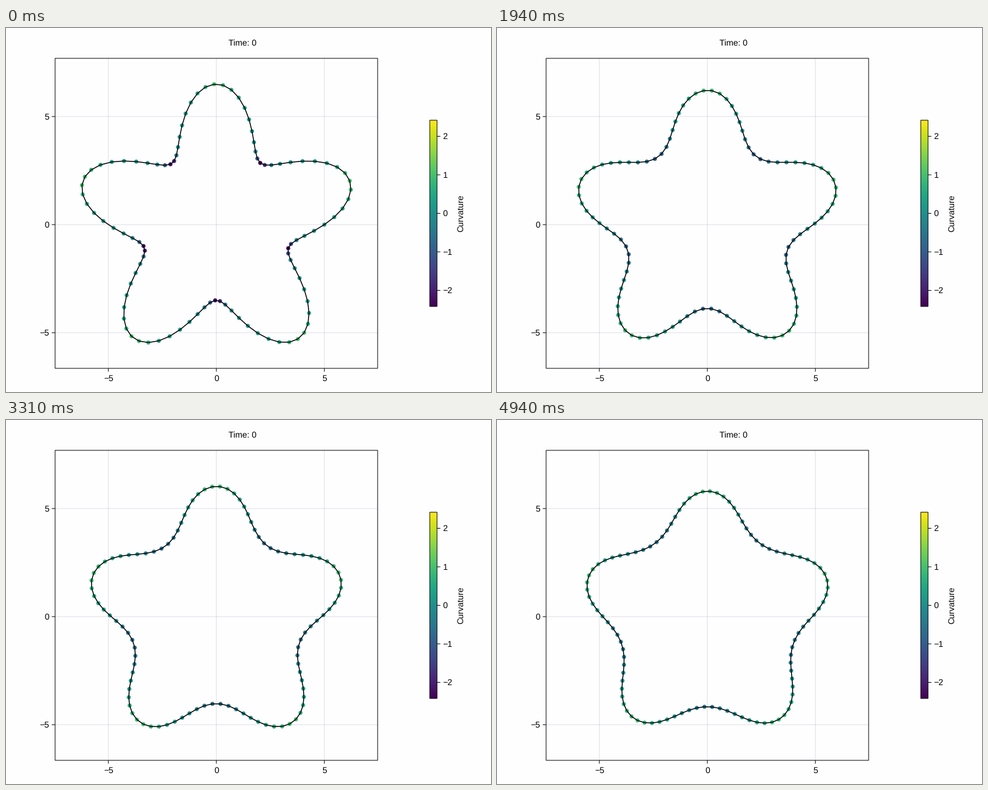
These frames come from a looping animation (800 px wide and 600 px high, 5 s). A matplotlib script:

```python
import math

import matplotlib.pyplot as plt
import numpy as np
from matplotlib.animation import FuncAnimation
from matplotlib.patches import Rectangle

W, H, DPI = 800, 600, 100
PX = 72 / DPI                       # one pixel in points
FRAMES, LOOP_MS = 80, 5000
STEPS, DT, SUBSTEPS = 75, 0.01, 2
RESAMPLE_EVERY, POINTS = 20, 100
SCALE, X0, Y0 = 35.63, 347, 324.1   # data units to pixels
LEFT, RIGHT, TOP, BOTTOM = 81, 613, 50, 561
BAR_X0, BAR_X1, BAR_Y0, BAR_Y1 = 699, 711, 152, 459
BAR_UNIT = 63.5
TICK = 5.5

plt.rcParams["font.family"] = "Liberation Sans"
plt.rcParams["font.size"] = 14 * PX
plt.rcParams["text.hinting"] = "none"


def star():
    angle = np.linspace(0, 2 * np.pi, 100)[:-1]
    r = 5 + 1.5 * np.sin(5 * angle)
    return np.column_stack([r * np.cos(angle), r * np.sin(angle)])


def curvature(p):
    """Signed three-point curvature and inward normals of a closed polygon."""
    a = p - np.roll(p, 1, axis=0)
    b = np.roll(p, -1, axis=0) - p
    chord = a + b
    la, lb, lc = (np.hypot(v[:, 0], v[:, 1]) for v in (a, b, chord))
    cross = a[:, 0] * b[:, 1] - a[:, 1] * b[:, 0]
    normal = np.column_stack([-chord[:, 1], chord[:, 0]]) / lc[:, None]
    k = 2 * cross / (la * lb * lc)
    k[0] = 0                        # the seam point rests between resamplings
    return k, normal


def resample(p, count):
    """Release the seam, then spread points evenly along the polygon."""
    seam = (p[-1:] + p[1:2]) / 2
    q = np.vstack([seam, p[1:], seam])
    d = np.diff(q, axis=0)
    s = np.concatenate([[0], np.cumsum(np.hypot(d[:, 0], d[:, 1]))])
    t = np.linspace(0, s[-1], count + 1)[:-1]
    return np.column_stack([np.interp(t, s, q[:, 0]), np.interp(t, s, q[:, 1])])


def simulate():
    """Curve-shortening flow: every point moves along its normal by curvature."""
    p = star()
    states = [p]
    for step in range(1, STEPS):
        for _ in range(SUBSTEPS):
            k, normal = curvature(p)
            p = p + DT / SUBSTEPS * k[:, None] * normal
        if step % RESAMPLE_EVERY == 0:
            p = resample(p, POINTS)
        states.append(p)
    return states


def to_px(p):
    return np.column_stack([X0 + SCALE * p[:, 0], Y0 - SCALE * p[:, 1]])


fig = plt.figure(figsize=(W / DPI, H / DPI), dpi=DPI, facecolor="#fefdff")
ax = fig.add_axes([0, 0, 1, 1])
ax.axis("off")


def segment(x0, y0, x1, y1, **style):
    ax.plot([x0, x1], [y0, y1], color="black", lw=PX, snap=False,
            solid_capstyle="butt", **style)


def box(x0, y0, x1, y1):
    ax.add_patch(Rectangle((x0, y0), x1 - x0, y1 - y0, fill=False, ec="black",
                           lw=PX, snap=False, zorder=6))


def label(x, y, text, ha="center", **kw):
    ax.text(x, y, text, ha=ha, va="baseline", color="black", **kw)


def number(v):
    return str(v).replace("-", "\u2212")


states = simulate()
limit = np.abs(curvature(states[0])[0]).max()

# Main axes
for v in (-5, 0, 5):
    x, y = X0 + SCALE * v, Y0 - SCALE * v
    segment(x, TOP, x, BOTTOM, alpha=0.12, zorder=1)
    segment(LEFT, y, RIGHT, y, alpha=0.12, zorder=1)
    segment(x, BOTTOM, x, BOTTOM + TICK, zorder=6)
    segment(LEFT - TICK, y, LEFT, y, zorder=6)
    label(x, 582.3, number(v))
    label(71, y + 5, number(v), ha="right")
box(LEFT, TOP, RIGHT, BOTTOM)
label(390, 29.3, "Time: 0")

# Colour bar
ax.imshow(np.linspace(1, 0, 256)[:, None], cmap="viridis", aspect="auto",
          extent=(BAR_X0, BAR_X1, BAR_Y1, BAR_Y0), zorder=2)
box(BAR_X0, BAR_Y0, BAR_X1, BAR_Y1)
for v in range(-2, 3):
    y = (BAR_Y0 + BAR_Y1) / 2 - BAR_UNIT * v
    segment(BAR_X1, y, BAR_X1 + TICK, y, zorder=6)
    label(720.5, y + 4.8, number(v), ha="left")
label(754, 305, "Curvature", rotation=90, rotation_mode="anchor")

dots = ax.scatter([], [], s=(6.75 * PX) ** 2, c=[], cmap="viridis",
                  vmin=-limit, vmax=limit, linewidths=0, snap=False, zorder=3)
outline, = ax.plot([], [], color="black", lw=1.5 * PX, zorder=4,
                   solid_joinstyle="miter", snap=False)
ax.set_xlim(0, W)
ax.set_ylim(H, 0)


def draw(frame):
    # 75 states are shown over 80 frames, so every 16th frame holds.
    p = states[math.ceil(frame * STEPS / FRAMES - 0.5)]
    q = to_px(p)
    dots.set_offsets(q)
    dots.set_array(curvature(p)[0])
    closed = np.vstack([q, q[:1]])
    outline.set_data(closed[:, 0], closed[:, 1])
    return dots, outline


anim = FuncAnimation(fig, draw, frames=FRAMES, interval=LOOP_MS / FRAMES,
                     init_func=lambda: draw(0), repeat=True, repeat_delay=0)
plt.show()
```
